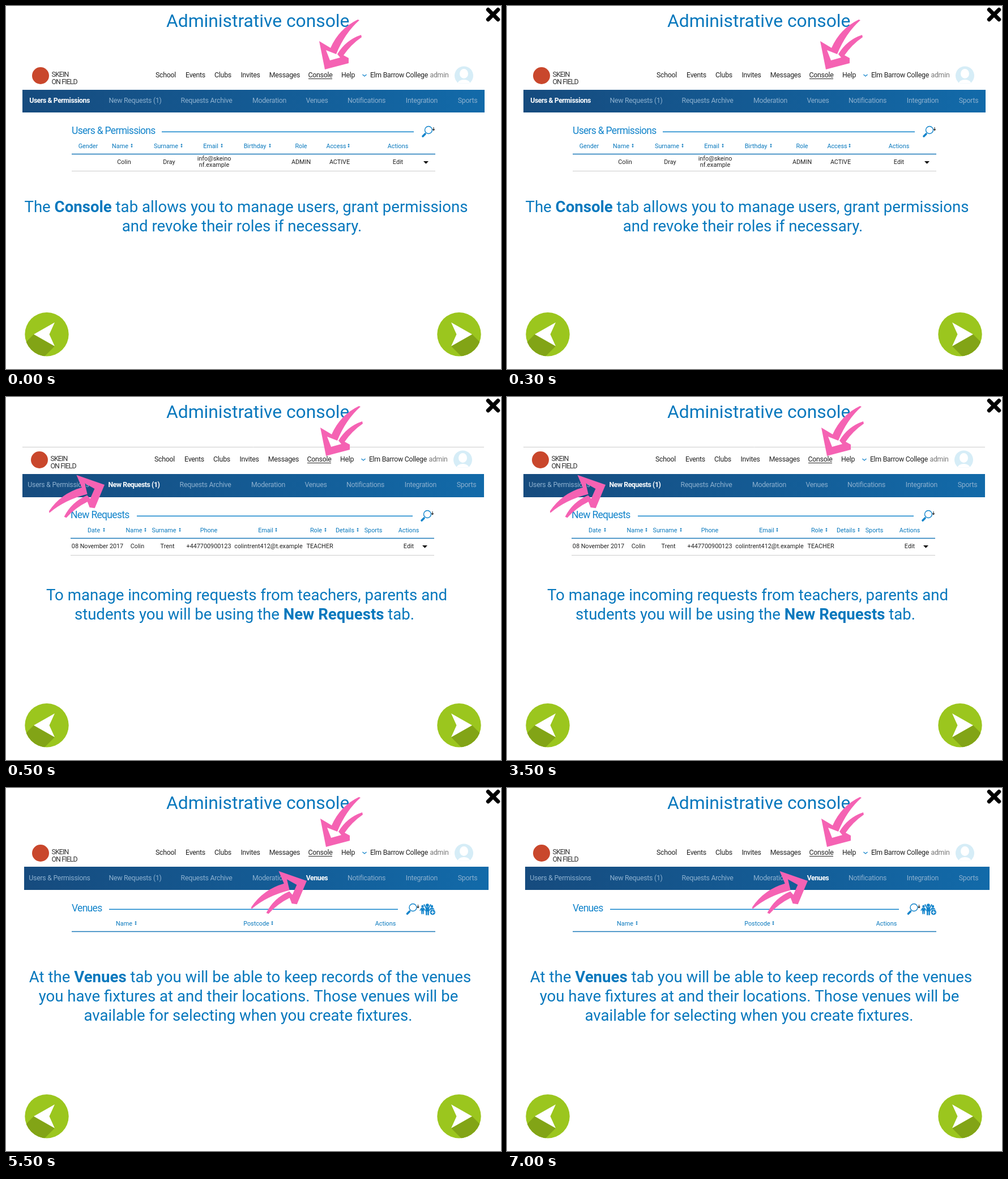
Animation of 874x641 px, one loop 8 s. Source, as an HTML page with a canvas:

```html
<!DOCTYPE html>
<html lang="en">
<head>
<meta charset="utf-8">
<title>Administrative console</title>
<style>
html, body { margin: 0; width: 100%; height: 100%; overflow: hidden; background: #fff; }
canvas { display: block; width: 874px; height: 641px; }
</style>
</head>
<body>
<canvas id="stage"></canvas>
<script>
const W = 874, H = 641, LOOP = 8000;
const BLUE = '#0878bd', LINE = '#1284cb', DARK = '#222', PINK = '#f562b3';
const canvas = document.getElementById('stage');
const ctx = canvas.getContext('2d');
const ratio = window.devicePixelRatio || 1;
canvas.width = W * ratio;
canvas.height = H * ratio;

const MENU = [['School', 282], ['Events', 334.5], ['Clubs', 383], ['Invites', 431.5],
  ['Messages', 492], ['Console', 555], ['Help', 604]];
const TABS = [['Users & Permissions', 94.5], ['New Requests (1)', 228], ['Requests Archive', 354],
  ['Moderation', 465], ['Venues', 549], ['Notifications', 636.5], ['Integration', 734], ['Sports', 815]];

// Column entries: label, centre x, optional x of the sort mark.
const SLIDES = [
  {
    start: 0, dx: 0, dy: 0, bar: [29, 148, 816, 40], tab: 0,
    heading: 'Users & Permissions', rule: [275, 720], search: 745, console: [563, 112],
    columns: [['Gender', 145], ['Name', 201.5, 222], ['Surname', 282.5, 310], ['Email', 361.5, 381],
      ['Birthday', 439.5, 466], ['Role', 521], ['Access', 583, 605], ['Actions', 692]],
    row: [['Colin', 208.5], ['Dray', 288], ['info@skeino\nnf.example', 367.5], ['ADMIN', 521],
      ['ACTIVE', 589], ['Edit', 692]],
    note: [['The *Console* tab allows you to manage users, grant permissions', 424],
      ['and revoke their roles if necessary.', 416.5]],
    noteY: 364
  },
  {
    start: 500, dx: -2, dy: -12, bar: [29, 136, 815, 41], tab: 1, topRule: true,
    heading: 'New Requests', rule: [233, 720], search: 745, console: [565, 104], pointer: [174, 155],
    columns: [['Date', 157, 175], ['Name', 228, 248], ['Surname', 281, 309], ['Phone', 360],
      ['Email', 460.5, 479], ['Role', 549.5, 566], ['Details', 600.5, 623], ['Sports', 650.5], ['Actions', 713]],
    row: [['08 November 2017', 163.5], ['Colin', 234], ['Trent', 287], ['+447700900123', 360],
      ['colintrent412@t.example', 465.5], ['TEACHER', 556], ['Edit', 713]],
    note: [['To manage incoming requests from teachers, parents and', 425],
      ['students you will be using the *New Requests* tab.', 421]],
    noteY: 359
  },
  {
    start: 5500, dx: 0, dy: -8, bar: [32, 139, 820, 41], tab: 4,
    heading: 'Venues', rule: [182, 692], search: 717.5, group: true, console: [565, 104], pointer: [531, 164],
    columns: [['Name', 208.5, 229], ['Postcode', 442, 470], ['Actions', 670]],
    note: [['At the *Venues* tab you will be able to keep records of the venues', 431],
      ['you have fixtures at and their locations. Those venues will be', 428],
      ['available for selecting when you create fixtures.', 427.5]],
    noteY: 343
  }
];

function setFont(size, weight = 400, spacing = 0) {
  ctx.font = `${weight} ${size}px Roboto, "Open Sans", sans-serif`;
  ctx.letterSpacing = spacing + 'px';
}

function text(str, x, y, color, align = 'center') {
  ctx.fillStyle = color;
  ctx.textAlign = align;
  ctx.fillText(str, x, y);
}

function line(x1, y1, x2, y2, color, width) {
  ctx.strokeStyle = color;
  ctx.lineWidth = width;
  ctx.beginPath();
  ctx.moveTo(x1, y1);
  ctx.lineTo(x2, y2);
  ctx.stroke();
}

function poly(points, color) {
  ctx.fillStyle = color;
  ctx.beginPath();
  points.forEach(([x, y]) => ctx.lineTo(x, y));
  ctx.closePath();
  ctx.fill();
}

function disc(x, y, r, color) {
  ctx.fillStyle = color;
  ctx.beginPath();
  ctx.arc(x, y, r, 0, Math.PI * 2);
  ctx.fill();
}

// Centred line; words between asterisks are heavier.
function richLine(str, cx, y) {
  const style = i => setFont(27.6, i % 2 ? 600 : 400);
  const parts = str.split('*');
  const widths = parts.map((part, i) => { style(i); return ctx.measureText(part).width; });
  let x = cx - widths.reduce((a, b) => a + b, 0) / 2;
  parts.forEach((part, i) => {
    style(i);
    text(part, x, y, BLUE, 'left');
    x += widths[i];
  });
}

function avatar(x, y) {
  ctx.save();
  ctx.beginPath();
  ctx.rect(x - 18, y - 18, 36, 31.5);
  ctx.clip();
  disc(x, y, 16.5, '#d6edf7');
  ctx.fillStyle = '#fff';
  ctx.beginPath();
  ctx.ellipse(x, y - 3.5, 7.5, 8.5, 0, 0, Math.PI * 2);
  ctx.ellipse(x, y + 14, 11, 7, 0, 0, Math.PI * 2);
  ctx.fill();
  ctx.restore();
}

function header() {
  disc(61, 123, 15, '#c9472c');
  setFont(12.4, 400, -0.9);
  text('SKEIN', 80.5, 125, '#333', 'left');
  text('ON FIELD', 80.5, 138, '#333', 'left');
  setFont(12.3, 400, -0.25);
  MENU.forEach(([label, x]) => text(label, x, 126, DARK));
  line(534, 128.5, 576, 128.5, DARK, 1);
  ctx.strokeStyle = LINE;
  ctx.lineWidth = 1.3;
  ctx.beginPath();
  ctx.moveTo(629.5, 121);
  ctx.lineTo(633, 124);
  ctx.lineTo(636.5, 121);
  ctx.stroke();
  text('Elm Barrow College', 745, 126, DARK, 'right');
  text('admin', 748.5, 126, '#777', 'left');
  avatar(808.5, 123);
}

function navBar([x, y, w, h]) {
  const fill = ctx.createLinearGradient(x, 0, x + w, 0);
  fill.addColorStop(0, '#164b7e');
  fill.addColorStop(1, '#126aa9');
  ctx.fillStyle = fill;
  ctx.fillRect(x, y, w, h);
}

function tabs(active) {
  TABS.forEach(([label, x], i) => {
    const on = i === active;
    setFont(12.3, on ? 700 : 400, on ? -0.45 : -0.25);
    text(label, x, 171, on ? '#fff' : '#8db1d0');
  });
}

function sortMark(x, y) {
  line(x, y - 2.5, x, y + 2.5, BLUE, 0.9);
  poly([[x - 1.8, y - 1.2], [x, y - 3.6], [x + 1.8, y - 1.2]], BLUE);
  poly([[x - 1.8, y + 1.2], [x, y + 3.6], [x + 1.8, y + 1.2]], BLUE);
}

function searchIcon(x, y) {
  ctx.lineCap = 'round';
  line(x - 5, y + 4, x - 9, y + 8, LINE, 3.6);
  ctx.lineCap = 'butt';
  ctx.strokeStyle = LINE;
  ctx.lineWidth = 1.4;
  ctx.beginPath();
  ctx.arc(x + 1, y - 3, 6.5, 0, Math.PI * 2);
  ctx.stroke();
  line(x + 10, y - 8, x + 10, y - 3, DARK, 1);
  poly([[x + 7.5, y - 4.5], [x + 12.5, y - 4.5], [x + 10, y - 1.5]], DARK);
}

function person(x, y, size, raised) {
  disc(x, y, 2.6 * size, LINE);
  ctx.fillStyle = LINE;
  ctx.fillRect(x - 3 * size, y + 3 * size, 6 * size, 7 * size);
  ctx.fillRect(x - 2.6 * size, y + 9 * size, 2.2 * size, 7 * size);
  ctx.fillRect(x + 0.4 * size, y + 9 * size, 2.2 * size, 7 * size);
  const hand = raised ? -1.5 : 9;
  for (const side of [-1, 1]) {
    line(x + side * 2.5 * size, y + 4 * size, x + side * 5.5 * size, y + hand * size, LINE, 1.8 * size);
  }
}

function groupIcon() {
  person(735.5, 217, 0.85, false);
  person(752, 217, 0.85, false);
  person(744, 215, 1.1, true);
  disc(753.3, 227.5, 5.5, '#fff');
  disc(753.3, 227.5, 4.7, LINE);
  line(750.3, 227.5, 756.3, 227.5, '#fff', 1.4);
  line(753.3, 224.5, 753.3, 230.5, '#fff', 1.4);
}

function table(slide) {
  setFont(17.5, 400, -0.7);
  text(slide.heading, 116, 226, LINE, 'left');
  line(slide.rule[0], 222.3, slide.rule[1], 222.3, LINE, 1.5);
  searchIcon(slide.search, 222);
  if (slide.group) groupIcon();
  setFont(10.8);
  slide.columns.forEach(([label, x, mark]) => {
    text(label, x, 250.5, BLUE);
    if (mark) sortMark(mark, 246.5);
  });
  line(116, 261.5, 758, 261.5, '#1b79b9', 1.6);
  if (!slide.row) return;
  slide.row.forEach(([value, x]) => {
    const lines = value.split('\n');
    const y = 278.5 - (lines.length - 1) * 5.5;
    lines.forEach((part, i) => text(part, x, y + i * 11, DARK));
  });
  poly([[737, 274], [746, 274], [741.5, 278.7]], '#111');
  line(116, 291.5, 758, 291.5, '#ccc', 1);
}

// Brushed arrow with its tip at the origin.
function arrow() {
  ctx.fillStyle = PINK;
  ctx.beginPath();
  ctx.moveTo(0, 0);
  ctx.lineTo(-10, -50);
  ctx.lineTo(10, -38);
  ctx.quadraticCurveTo(25, -72, 58, -88);
  ctx.lineTo(61, -87);
  ctx.quadraticCurveTo(35, -64, 20, -27);
  ctx.lineTo(2, -34);
  ctx.lineTo(9, -16);
  ctx.lineTo(27, -21);
  ctx.lineTo(22, -27);
  ctx.quadraticCurveTo(37, -52, 64, -61);
  ctx.lineTo(65, -57);
  ctx.quadraticCurveTo(46, -44, 33, -25);
  ctx.lineTo(42, -20);
  ctx.lineTo(42, -11);
  ctx.closePath();
  ctx.fill();
}

function consoleArrow([x, y]) {
  ctx.save();
  ctx.translate(x, y);
  arrow();
  ctx.restore();
}

// The same arrow mirrored so that it points right.
function tabArrow([x, y]) {
  const angle = 98 * Math.PI / 180, c = 1.03 * Math.cos(angle), s = 1.03 * Math.sin(angle);
  ctx.save();
  ctx.transform(c, s, s, -c, x, y);
  arrow();
  ctx.restore();
}

// Points right; dir -1 mirrors it together with its shadow.
function pageButton(cx, dir) {
  const tip = [23, 0], top = [-14, -21], notch = [-4.5, 0], low = [-14, 21];
  const cast = ([x, y]) => [x + 60, y + 60];
  ctx.save();
  ctx.translate(cx, 579.7);
  ctx.scale(dir, 1);
  ctx.beginPath();
  ctx.arc(0, 0, 38.7, 0, Math.PI * 2);
  ctx.clip();
  ctx.fillStyle = '#9bc61e';
  ctx.fillRect(-40, -40, 80, 80);
  poly([tip, low, cast(low), cast(tip)], '#82a416');
  poly([tip, top, notch, low], '#fff');
  ctx.restore();
}

function closeMark() {
  ctx.lineCap = 'round';
  line(851.3, 6.5, 868.7, 23.8, '#000', 7);
  line(868.7, 6.5, 851.3, 23.8, '#000', 7);
  ctx.lineCap = 'butt';
}

function draw(time) {
  const slide = SLIDES.filter(s => s.start <= time).pop();
  ctx.setTransform(ratio, 0, 0, ratio, 0, 0);
  ctx.fillStyle = '#fff';
  ctx.fillRect(0, 0, W, H);
  setFont(31.8);
  text('Administrative console', 283, 37, BLUE, 'left');
  closeMark();

  if (slide.topRule) line(29, 88.5, 844, 88.5, '#ccc', 1);
  navBar(slide.bar);
  ctx.save();
  ctx.translate(slide.dx, slide.dy);
  header();
  tabs(slide.tab);
  table(slide);
  ctx.restore();

  slide.note.forEach(([str, x], i) => richLine(str, x, slide.noteY + i * 34));
  consoleArrow(slide.console);
  if (slide.pointer) tabArrow(slide.pointer);
  pageButton(72, -1);
  pageButton(800, 1);
}

const begin = performance.now();
function tick() {
  draw((performance.now() - begin) % LOOP);
  requestAnimationFrame(tick);
}
tick();
</script>
</body>
</html>
```
